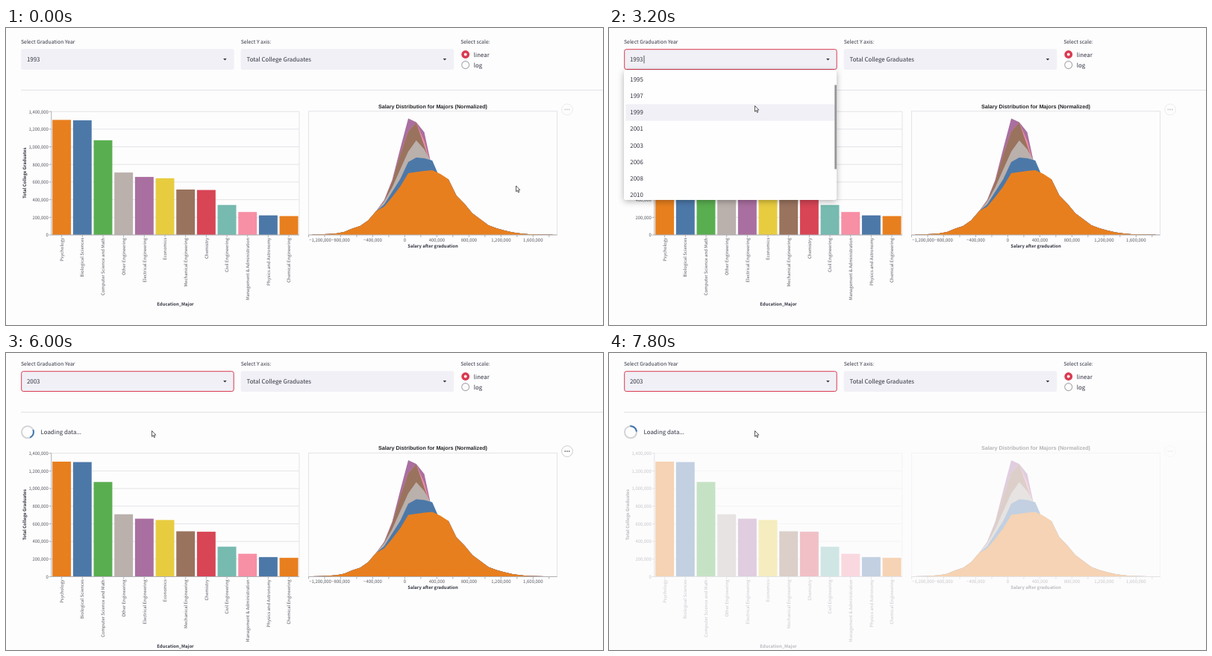
An HTML page with a canvas that plays this animation: 800 px wide and 399 px high, repeating every 8000 ms.

```html
<!DOCTYPE html>
<html lang="en">
<head>
<meta charset="utf-8">
<title>Graduates dashboard</title>
<style>
html, body { margin: 0; width: 100%; height: 100%; overflow: hidden; background: #fdfdfe; }
canvas { display: block; width: 800px; height: 399px; }
</style>
</head>
<body>
<canvas id="stage"></canvas>
<script>
const W = 800, H = 399, LOOP = 8000, STEP = 200;
const canvas = document.getElementById('stage');
const ctx = canvas.getContext('2d');
const dpr = window.devicePixelRatio || 1;
canvas.width = Math.round(W * dpr);
canvas.height = Math.round(H * dpr);

const UI = '"Noto Sans CJK JP", "Noto Sans CJK SC", "Noto Sans CJK", "Noto Sans", sans-serif';
const ARIAL = '"Liberation Sans", Arial, sans-serif';
const BODY = 7.88, LABEL = 6.89, AXIS = 5.93;
const BG = '#fdfdfe', INK = '#31333f', AXIS_INK = '#595a60', GRID = '#e4e4e7', LINE = '#b0b0b4';
const FIELD = '#f0f0f6', RED = '#d93a50';
const C = {
  orange: '#e87f1e', blue: '#4c78a8', green: '#59ae4f', gray: '#bab0ac', purple: '#a96fa0',
  yellow: '#e8cc40', brown: '#9a735e', red: '#d84555', teal: '#76bab0', pink: '#f78fa5'
};

// Graduates in thousands
const BARS = [
  ['Psychology', 1305, C.orange], ['Biological Sciences', 1300, C.blue],
  ['Computer Science and Math', 1074, C.green], ['Other Engineering', 708, C.gray],
  ['Electrical Engineering', 658, C.purple], ['Economics', 643, C.yellow],
  ['Mechanical Engineering', 515, C.brown], ['Chemistry', 510, C.red],
  ['Civil Engineering', 340, C.teal], ['Management & Administration', 260, C.pink],
  ['Physics and Astronomy', 222, C.blue], ['Chemical Engineering', 214, C.orange]
];
const YEARS = [1993, 1995, 1997, 1999, 2001, 2003, 2006, 2008, 2010, 2013, 2015];

// Heights of the front area; the ones behind it rise above it from index 9 on
const BASE = [.5, .8, 1.2, 2, 4, 8.5, 12, 19.5, 32, 38, 51, 65, 83, 84.5, 86, 87, 82, 75, 53, 42,
  29, 21, 13, 9, 6, 3.5, 2, 1, .8, .6, .5];
const LAYERS = [
  [C.purple, [47, 74, 116, 156.5, 151.5, 138, 88, 50]],
  [C.pink, [46, 72, 108, 139, 151, 126, 88, 50]],
  [C.brown, [46, 72, 108, 139, 151, 120, 88, 50]],
  [C.gray, [45, 64, 88, 112, 127, 115, 96, 60]],
  [C.blue, [41, 58, 75, 98, 104, 103, 100, 75]],
  [C.orange, []]
];

// [time, x, y] of the pointer, held until the next entry
const POINTER = [
  [0, 683.5, 212], [200, 680, 211], [400, 645, 203], [600, 600, 190], [800, 558.5, 178.5],
  [1000, 160.5, 43.5], [1200, 164, 45], [1400, 166.5, 45.5], [2400, 172, 62],
  [2600, 186, 86], [2800, 195.5, 104.5]
];
// [time, scroll, highlighted row] of the open menu
const MENU = [[1800, 0, 0], [2600, 0, 1], [2800, 0, 2], [3200, 24, 3], [3400, 54, 4],
  [3600, 77.2, 4], [5000, 77.2, 5]];
const OPEN = 1800, PICK = 5200, RERUN = 5400, FADE = 6000;

const at = (keys, t) => keys.filter(k => k[0] <= t).pop();

function rect(x, y, w, h, color) {
  ctx.fillStyle = color;
  ctx.fillRect(x, y, w, h);
}

function box(x, y, w, h, r, fill, stroke) {
  ctx.beginPath();
  ctx.roundRect(x, y, w, h, r);
  ctx.fillStyle = fill;
  ctx.fill();
  if (stroke) {
    ctx.strokeStyle = stroke;
    ctx.stroke();
  }
}

function disc(x, y, r, fill, stroke, width = 1) {
  ctx.beginPath();
  ctx.arc(x, y, r, 0, Math.PI * 2);
  ctx.fillStyle = fill;
  ctx.fill();
  if (stroke) {
    ctx.lineWidth = width;
    ctx.strokeStyle = stroke;
    ctx.stroke();
    ctx.lineWidth = 1;
  }
}

function shape(points, fill) {
  ctx.beginPath();
  points.forEach(p => ctx.lineTo(p[0], p[1]));
  ctx.closePath();
  ctx.fillStyle = fill;
  ctx.fill();
}

// y is the middle of the capitals
function text(str, x, y, size, { color = INK, align = 'left', weight = 400, font = UI } = {}) {
  ctx.font = `${weight} ${size}px ${font}`;
  ctx.textAlign = align;
  ctx.fillStyle = color;
  ctx.fillText(str, x, y + size * .365);
}

function upright(str, x, y, size, opts) {
  ctx.save();
  ctx.translate(x, y);
  ctx.rotate(-Math.PI / 2);
  text(str, 0, 0, size, opts);
  ctx.restore();
}

const withShadow = (blur, dy, alpha, draw) => {
  ctx.save();
  ctx.shadowColor = `rgba(0,0,0,${alpha})`;
  ctx.shadowBlur = blur * dpr;
  ctx.shadowOffsetY = dy * dpr;
  draw();
  ctx.restore();
};

function select(x, value, focused) {
  const w = 285.5;
  if (focused) box(x + .5, 28.7, w - 1, 26.8, 2.5, FIELD, RED);
  else box(x, 28.2, w, 27.8, 2.5, FIELD);
  text(value, x + 7.8, 42.2, BODY);
  const cx = x + w - 12.3;
  shape([[cx - 2.3, 41.1], [cx + 2.3, 41.1], [cx, 43.6]], INK);
}

function controls(t) {
  text('Select Graduation Year', 20, 18, LABEL);
  text('Select Y axis:', 314.7, 18, LABEL);
  text('Select scale:', 609.2, 18, LABEL);
  select(20.2, t < PICK ? '1993' : '2003', t >= OPEN);
  select(314.7, 'Total College Graduates', false);
  disc(615.7, 35.5, 5.4, RED);
  disc(615.7, 35.5, 1.9, '#fff');
  disc(615.7, 49.6, 5, '#fcfcfd', '#a9a9ae', 1.1);
  text('linear', 626.8, 35.8, BODY);
  text('log', 626.8, 49.8, BODY);
  rect(20, 83, 780, 1, '#e2e2e6');
}

function barChart() {
  const x0 = 60.8, x1 = 392.9, y0 = 278, h = 165.8, pitch = (x1 - x0) / BARS.length;
  for (let i = 0; i <= 7; i++) {
    const y = y0 - h * i / 7;
    rect(x0, y - .5, x1 - x0, 1, GRID);
    rect(x0 - 3, y - .5, 3, 1, LINE);
    text((i * 200000).toLocaleString('en-US'), x0 - 4, y + .2, AXIS, { color: AXIS_INK, align: 'right' });
  }
  rect(x1 - .5, y0 - h, 1, h, GRID);
  BARS.forEach(([name, value, color], i) => {
    const x = x0 + pitch * (i + .05), mid = x0 + pitch * (i + .5);
    const bar = h * value / 1400;
    rect(x, y0 - bar, pitch * .9, bar, color);
    rect(mid - .5, y0, 1, 3, LINE);
    upright(name, mid, y0 + 3.8, AXIS, { color: AXIS_INK, align: 'right' });
  });
  rect(x0 - .5, y0 - h, 1, h, LINE);
  rect(x0, y0 - .5, x1 - x0, 1, LINE);
  upright('Total College Graduates', 25.2, 194.8, AXIS, { align: 'center', weight: 700 });
  text('Education_Major', 227, 371, AXIS, { align: 'center', weight: 700 });
}

function areaChart() {
  const x0 = 405.5, x1 = 738.5, y0 = 278, top = 112, bin = (x1 - x0) / 31;
  ctx.strokeStyle = GRID;
  ctx.strokeRect(x0, top - .2, x1 - x0, y0 - top);
  for (const [color, upper] of LAYERS) {
    const line = BASE.map((v, i) => [x0 + bin * (i + .43), y0 - (upper[i - 9] ?? v)]);
    shape([[line[0][0], y0], ...line, [line[30][0], y0]], color);
  }
  rect(x0, y0 - .5, x1 - x0, 1, LINE);
  for (let k = -12; k <= 18; k += 2) {
    const x = x0 + bin * (k + 12);
    rect(x - .5, y0, 1, 3, LINE);
    if (k % 4) continue;
    const label = (k * 100000).toLocaleString('en-US').replace('-', '\u2212');
    const edge = k === -12;
    text(label, edge ? x0 + .8 : x, 284.5, AXIS, { color: AXIS_INK, align: edge ? 'left' : 'center' });
  }
  text('Salary after graduation', 572, 292.8, AXIS, { align: 'center', weight: 700 });
  text('Salary Distribution for Majors (Normalized)', 572, 105, 7.18,
    { align: 'center', weight: 700, font: ARIAL, color: '#222326' });
}

// The button lights up while the pointer is over the charts, then dims
function actions(t) {
  const left = t < PICK ? 1000 : 5800;
  const hovered = (t >= 200 && t < OPEN) || t >= PICK;
  const glow = hovered ? Math.min(1, 1 - (t - left) / 500) : 0;
  ctx.globalAlpha = Math.max(.22, glow);
  disc(752, 109.5, 7.4, '#fff', '#a5a5a8', .9);
  for (const d of [-2.7, 0, 2.7]) disc(752 + d, 109.5, .9, '#222');
  ctx.globalAlpha = 1;
}

function tooltip() {
  withShadow(4, 1, .2, () => box(564.5, 184.5, 124, 20.5, 1.5, '#fdfdfd', '#c9c9cc'));
  text('Education_Major:', 569.8, 194.7, 6.05, { font: ARIAL, color: '#808084' });
  text('Physics and Astronomy', 620, 194.7, 6.05, { font: ARIAL, color: '#111' });
}

function menu(t) {
  const [, scroll, active] = at(MENU, t);
  const row = 22.1;
  withShadow(8, 2, .3, () => box(20, 57, 285, 174, 2, '#fefefe'));
  ctx.save();
  ctx.beginPath();
  ctx.rect(20, 59.6, 285, 167.4);
  ctx.clip();
  YEARS.forEach((year, i) => {
    const y = 71.2 + row * i - scroll;
    if (i === active) rect(22.5, y - row / 2, 280, row, FIELD);
    text(year, 28.3, y, BODY);
  });
  ctx.restore();
  if (scroll) rect(302.3, 60 + scroll * .69, 2.7, 113, '#97979b');
  if ((t - OPEN) % 1000 < 500) rect(46.6, 37, .8, 10.5, INK);
}

function spinner(t) {
  const mid = ((t - 6800) / 1000) * Math.PI * 2 - Math.PI * .28;
  ctx.lineWidth = 2;
  ctx.strokeStyle = '#d3d3d8';
  ctx.beginPath();
  ctx.arc(29, 106.3, 8, 0, Math.PI * 2);
  ctx.stroke();
  ctx.strokeStyle = '#3f76ae';
  ctx.beginPath();
  ctx.arc(29, 106.3, 8, mid - Math.PI / 4, mid + Math.PI / 4);
  ctx.stroke();
  ctx.lineWidth = 1;
  text('Loading data...', 46.6, 106.5, BODY);
}

function pointer(t) {
  const [, x, y] = at(POINTER, t);
  ctx.save();
  ctx.translate(x, y);
  if (t >= 1400 && t < 2400) {
    rect(-.4, -4, .9, 8, '#222');
    rect(-1.8, -4.2, 3.6, .8, '#222');
    rect(-1.8, 3.6, 3.6, .8, '#222');
  } else {
    shape([[0, 0], [0, 7.8], [1.8, 6.2], [3, 9], [4.2, 8.5], [3, 5.8], [5.3, 5.6]], '#fff');
    ctx.strokeStyle = '#333';
    ctx.lineWidth = .8;
    ctx.stroke();
  }
  ctx.restore();
}

function shifted(dy, draw) {
  ctx.save();
  ctx.translate(0, dy);
  draw();
  ctx.restore();
}

// Ease-in of the stale charts from full to one third
function staleness(t) {
  const p = Math.min(1, Math.max(0, (t - FADE) / 1000));
  return .67 * Math.pow(p, 1.75);
}

function render(t) {
  const rerun = t >= RERUN;
  ctx.setTransform(canvas.width / W, 0, 0, canvas.height / H, 0, 0);
  ctx.textRendering = 'geometricPrecision';
  ctx.lineWidth = 1;
  rect(0, 0, W, H, BG);
  shifted(rerun ? 22.5 : 0, () => {
    barChart();
    areaChart();
    actions(t);
  });
  if (t > FADE) {
    ctx.globalAlpha = staleness(t);
    rect(0, 118, W, H - 118, BG);
    ctx.globalAlpha = 1;
  }
  shifted(rerun ? -4 : 0, () => controls(t));
  if (rerun) spinner(t);
  if (t >= 800 && t < 1200) tooltip();
  if (t >= OPEN && t < PICK) menu(t);
  pointer(t);
}

function tick(now) {
  render(Math.floor((now % LOOP) / STEP) * STEP);
  requestAnimationFrame(tick);
}
requestAnimationFrame(tick);
</script>
</body>
</html>
```
